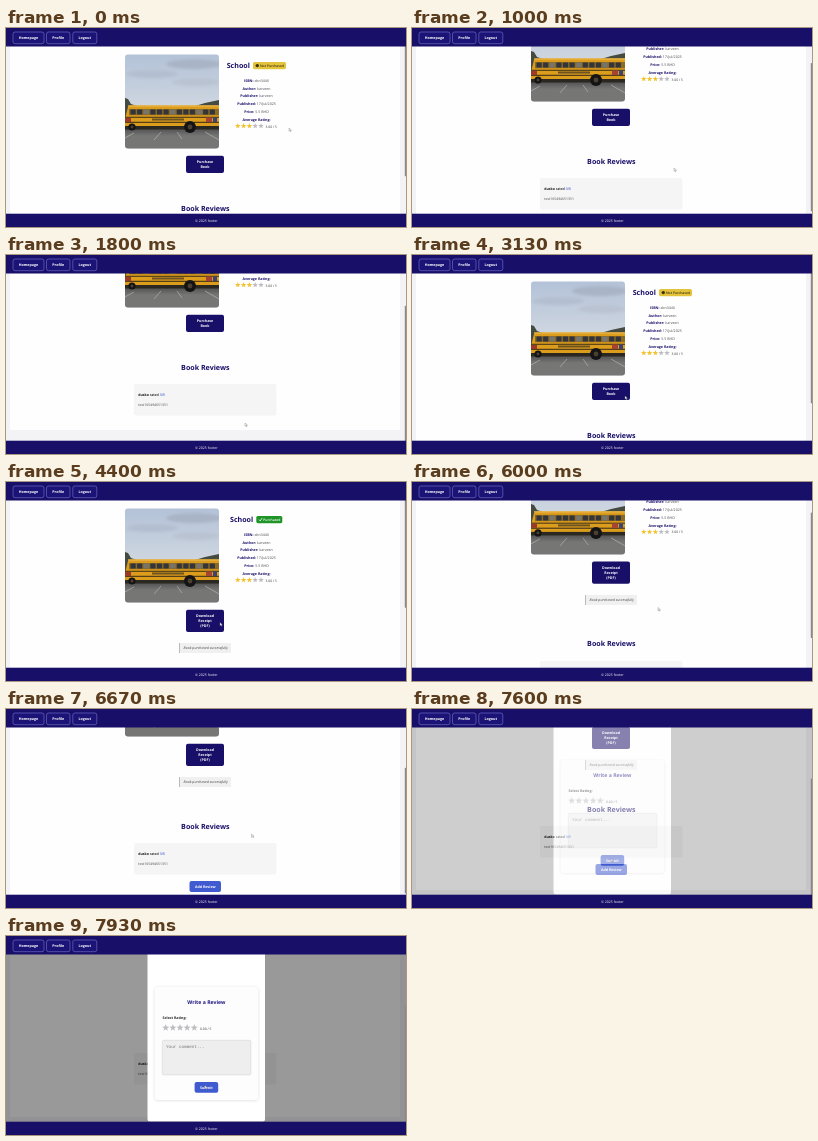
Recreate the animation shown at these times as an HTML page. Size 400x199 px, loop 8 s.

```html
<!DOCTYPE html>
<html lang="en">
<head>
<meta charset="utf-8">
<title>Book page</title>
<style>
  html, body { margin: 0; width: 100%; height: 100%; overflow: hidden; background: #f6f6f8; }
  svg { display: block; width: 100%; height: 100%; }
  text { font-family: "Open Sans", "Noto Sans", sans-serif; text-rendering: geometricPrecision; }
  .mono { font-family: "Liberation Mono", monospace; }
  .b { font-weight: 700; }
  .sb { font-weight: 600; }
  .i { font-style: italic; }
</style>
</head>
<body>
<svg id="stage" viewBox="0 0 400 199" preserveAspectRatio="none"></svg>
<script>
const LOOP = 8000, PURCHASE_AT = 4000, MODAL_AT = 7530, MODAL_FADE = 150;
const NAVY = '#180f68', BLUE = '#3f5bcf', GOLD = '#f2c230', GREY = '#bdbdc1';

// time, scroll offset
const scrollKeys = [[0, 0], [350, 0], [1000, 47], [1400, 68], [2000, 68], [2600, 0],
  [5200, 0], [5400, 16], [5850, 42], [6550, 93], [6850, 93], [7300, 110]];
// time, x, y
const cursorKeys = [[0, 283, 100], [300, 283, 100], [1000, 262, 140], [1700, 239, 168], [2050, 239, 168],
  [2800, 213, 141], [4300, 213, 141], [5300, 246.5, 126], [6700, 245.5, 125], [7400, 199, 149.5]];

function sample(keys, t) {
  const next = keys.findIndex(k => k[0] > t);
  if (next < 0) return keys.at(-1).slice(1);
  const a = keys[next - 1], b = keys[next];
  const u = (t - a[0]) / (b[0] - a[0]), e = u * u * (3 - 2 * u);
  return a.slice(1).map((v, i) => v + (b[i + 1] - v) * e);
}

const rect = (x, y, w, h, fill, r = 0, extra = '') =>
  `<rect x="${x}" y="${y}" width="${w}" height="${h}" rx="${r}" fill="${fill}" ${extra}/>`;

// y is the middle of the capitals
const text = (x, y, size, str, fill, cls = '', anchor = 'middle') =>
  `<text x="${x}" y="${y + size * 0.36}" font-size="${size}" fill="${fill}" class="${cls}" text-anchor="${anchor}">${str}</text>`;

function star(cx, cy, r, fill) {
  const points = Array.from({ length: 10 }, (_, i) => {
    const a = i * Math.PI / 5, d = i % 2 ? r * 0.42 : r;
    return `${(cx + d * Math.sin(a)).toFixed(2)},${(cy - d * Math.cos(a)).toFixed(2)}`;
  });
  return `<polygon points="${points.join(' ')}" fill="${fill}"/>`;
}

const stars = (x, y, step, r, filled) =>
  [0, 1, 2, 3, 4].map(i => star(x + i * step, y, r, i < filled ? GOLD : GREY)).join('');

const button = (x, y, w, h, fill, lines, gap = 5.4) =>
  rect(x, y, w, h, fill, 2) + lines.map((line, i) =>
    text(x + w / 2, y + h / 2 + (i - (lines.length - 1) / 2) * gap, 3.6, line, '#fff', 'b')).join('');

const navButton = (x, w, label) =>
  rect(x, 4, w, 11.7, '#1c1376', 2, 'stroke="#6c69c4" stroke-width=".7"') +
  text(x + w / 2, 9.9, 3.65, label, '#fff', 'b');

function photo() {
  const windows = Array.from({ length: 13 }, (_, i) =>
    rect(124.5 + i * 6.6, 81.6, 5.2, 5, i % 4 === 2 ? '#77746c' : '#33353a', 0.5)).join('');
  const wheel = (x, r) =>
    `<circle cx="${x}" cy="99" r="${r}" fill="#141416"/><circle cx="${x}" cy="99" r="${r * 0.4}" fill="#4b4030"/>`;
  return `<g clip-path="url(#photoClip)">
    ${rect(119, 26, 94, 95, 'url(#sky)')}
    <g filter="url(#soft)">
      <ellipse cx="188" cy="36" rx="28" ry="5" fill="#a9b4c6"/>
      <ellipse cx="146" cy="46" rx="26" ry="4" fill="#b3bfd0"/>
      <ellipse cx="190" cy="54" rx="24" ry="4" fill="#b9c3d1"/>
    </g>
    <path d="M119 70l3 1 3 5 6 2h58l10-3 14-3v26h-94z" fill="#454b40"/>
    ${rect(119, 95, 94, 26, 'url(#road)')}
    <path d="M128 105l-9 5M155 104l-7 8M171 104l5 7M199 104l14 8" stroke="#bdbcba" stroke-width=".6"/>
    <path d="M119 91l3-12q1-1.500 3-1.500h88v22.500h-94z" fill="#dc9c1c"/>
    ${rect(122, 77.3, 91, 1.4, '#e9b548')}
    ${rect(123, 81, 90, 6.2, '#8a6a24')}
    ${windows}
    ${rect(119, 88.8, 94, 0.9, '#2c2618')}
    ${rect(119, 93.8, 94, 1, '#352b17')}
    ${rect(146, 90.5, 32, 2, '#6e5520')}
    ${rect(119, 90, 6, 4, '#9c3a2a')}
    ${rect(200, 89.5, 6, 4.5, '#a8432f')}${rect(207, 89.5, 4, 4.5, '#3c4378')}
    ${rect(119, 98, 94, 3.5, '#2b2822')}
    ${wheel(184, 6)}${wheel(126, 3.6)}
  </g>`;
}

function details() {
  const rows = [['ISBN', 'xbn3446'], ['Author', 'karveen'], ['Publisher', 'karveen'],
    ['Published', '17/Jul/2025'], ['Price', '5.5 BHD'], ['Average Rating', '']];
  return rows.map(([label, value], i) => text(250.5, 52.3 + i * 7.92, 3.6,
    `<tspan class="b" fill="${NAVY}">${label}:</tspan> ${value}`, '#4a4a50')).join('') +
    stars(231.8, 98, 5.8, 2.9, 3) + text(259.5, 98.4, 3.3, '3.00 / 5', '#333', '', 'start');
}

const reviews = y =>
  text(199.3, y, 7.1, 'Book Reviews', NAVY, 'b') +
  rect(128, y + 17, 142.5, 31.5, '#f5f5f6', 2) +
  text(132.3, y + 27.6, 3.5, `<tspan class="b">dusko</tspan> <tspan class="sb">rated</tspan> <tspan class="sb" fill="${BLUE}">3/5</tspan>`, '#111', '', 'start') +
  text(132.3, y + 37.6, 3.45, 'test165494651351', '#444', '', 'start');

const beforePurchase =
  text(220.7, 37.8, 7.1, 'School', NAVY, 'b', 'start') +
  rect(247, 34, 33, 7.2, '#e3c23c', 1.6) +
  '<circle cx="251.300" cy="37.600" r="1.700" fill="#3a3210"/>' +
  text(266, 37.6, 3.4, 'Not Purchased', '#3a3210', 'sb') +
  button(180, 127.7, 38, 17.2, NAVY, ['Purchase', 'Book'], 5) +
  reviews(180);

const afterPurchase =
  text(224, 37.8, 7.1, 'School', NAVY, 'b', 'start') +
  rect(250.3, 34, 26, 7.2, '#1f9427', 1.6) +
  '<path d="M253 37.600l1.200 1.300 2-2.800" fill="none" stroke="#fff" stroke-width=".8"/>' +
  text(265.8, 37.6, 3.4, 'Purchased', '#fff', 'sb') +
  button(180, 127.7, 38, 22.2, NAVY, ['Download', 'Receipt', '(PDF)']) +
  rect(173.5, 161, 51.5, 10, '#f0f0f1') + rect(173.2, 161, 0.8, 10, '#aaa') +
  text(199.7, 166, 3.55, 'Book purchased successfully', '#444', 'i') +
  reviews(210) +
  button(183.5, 265, 31.5, 11, BLUE, ['Add Review']);

const modal =
  rect(0, 18, 400, 168, '#000', 0, 'opacity=".4"') +
  rect(141.5, 15, 117.5, 170.6, '#fff', 2.5) +
  rect(148.7, 51.5, 103.5, 113, '#000', 3, 'opacity=".14" filter="url(#soft)"') +
  rect(148.7, 51, 103.5, 113, '#fdfdfd', 3) +
  text(200.3, 66.5, 5.15, 'Write a Review', '#1c1580', 'b') +
  text(156.5, 81.6, 3.55, 'Select Rating:', '#222', 'b', 'start') +
  stars(159.7, 91.8, 7.15, 3.7, 0) +
  text(194, 92.6, 3.3, '0.00 / 5', '#333', '', 'start') +
  rect(156.3, 104.3, 88.5, 34.5, '#eeeeef', 1.2, 'stroke="#cfcfd2" stroke-width=".5"') +
  text(160, 110.2, 4.3, 'Your comment...', '#777', 'mono', 'start') +
  button(188.6, 146, 23.6, 10.8, BLUE, ['Submit']);

document.getElementById('stage').innerHTML = `
  <defs>
    <linearGradient id="sky" x2="0" y2="1">
      <stop offset="0" stop-color="#b3c2d8"/><stop offset=".55" stop-color="#ced6e0"/>
    </linearGradient>
    <linearGradient id="road" x2="0" y2="1">
      <stop offset=".2" stop-color="#4f4f50"/><stop offset=".5" stop-color="#767675"/>
    </linearGradient>
    <clipPath id="photoClip"><rect x="119" y="26.500" width="94" height="94" rx="3"/></clipPath>
    <filter id="soft"><feGaussianBlur stdDeviation="1.800"/></filter>
  </defs>
  ${rect(0, 0, 400, 199, '#f3f3f6')}
  <g id="page">
    <rect id="sheet" x="4" width="390" fill="#fefefe"/>
    ${photo()}${details()}
    <g id="before">${beforePurchase}</g>
    <g id="after">${afterPurchase}</g>
  </g>
  <g id="modal">${modal}</g>
  <rect id="thumb" x="398.800" width="1.200" rx=".5" fill="#88888c"/>
  ${rect(0, 0, 400, 18.5, NAVY)}
  ${navButton(7, 31, 'Homepage')}${navButton(40.5, 23.5, 'Profile')}${navButton(66.8, 24, 'Logout')}
  ${rect(0, 185.7, 400, 13.3, NAVY)}
  ${text(200.3, 192.6, 3.5, '© 2025 footer', '#fff')}
  <path id="cursor" d="M0 0v3.200l.8-.7.6 1.200.6-.3-.6-1.200h1.100z" fill="#fff" stroke="#666" stroke-width=".35"/>`;

const el = id => document.getElementById(id);
const set = (id, attrs) => Object.entries(attrs).forEach(([k, v]) => el(id).setAttribute(k, v));

function draw(t) {
  const [scroll] = sample(scrollKeys, t), [x, y] = sample(cursorKeys, t);
  const bought = t >= PURCHASE_AT, sheetEnd = bought ? 291 : 243;
  const pageHeight = sheetEnd + 24;
  set('page', { transform: `translate(0 ${-scroll})` });
  set('sheet', { height: sheetEnd });
  set('before', { display: bought ? 'none' : 'inline' });
  set('after', { display: bought ? 'inline' : 'none' });
  set('thumb', { y: scroll * 199 / pageHeight, height: 199 * 199 / pageHeight });
  set('cursor', { transform: `translate(${x} ${y})` });
  set('modal', { opacity: Math.min(1, Math.max(0, (t - MODAL_AT) / MODAL_FADE)) });
}

const start = performance.now();
function tick() {
  draw((performance.now() - start) % LOOP);
  requestAnimationFrame(tick);
}
tick();
</script>
</body>
</html>
```
